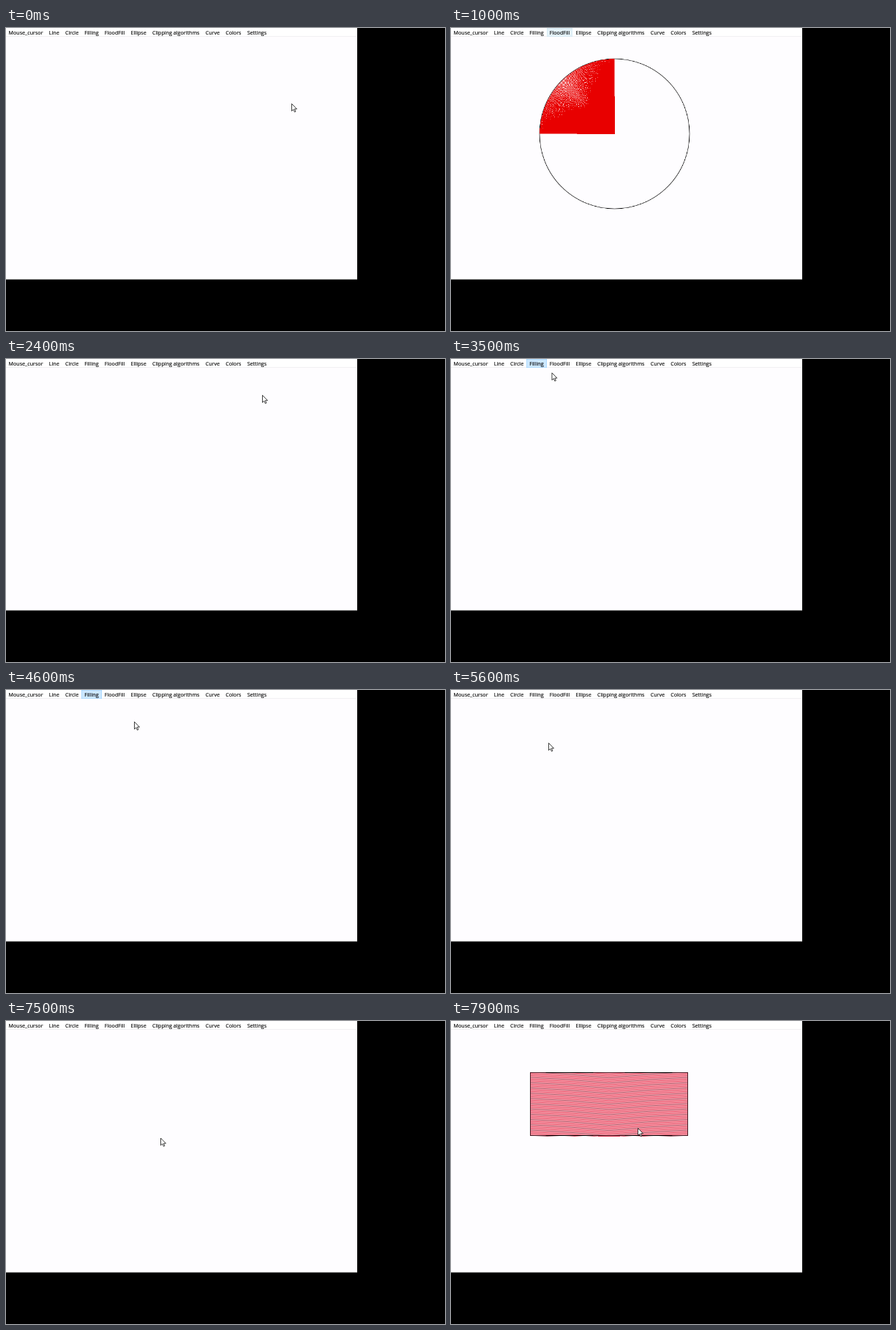
An HTML page with a canvas that plays this animation: 600 by 414 pixels, repeating every 8000 ms.

```html
<!DOCTYPE html>
<html lang="en">
<head>
<meta charset="utf-8">
<title>Drawing program</title>
<style>
  html, body { margin: 0; width: 100%; height: 100%; overflow: hidden; background: #000; }
  #window {
    position: absolute; left: 0; top: 0; width: 480px; height: 343px;
    background: #fefdff; border-bottom: 1px solid #888; overflow: hidden;
  }
  #menu {
    position: absolute; left: 0; top: 0; width: 480px; height: 11px; padding-left: 0;
    display: flex; background: #fff; border-bottom: 1px solid #f1f1f3;
  }
  #menu span {
    flex: none; height: 12px; padding: 0 4.1px; position: relative; left: -.6px;
    font: 7.15px/12px "Open Sans", "Noto Sans", sans-serif; color: #000;
    -webkit-text-stroke: .12px #000; white-space: pre;
  }
  #menu .hover { background: #e4f2f9; box-shadow: inset 0 0 0 .6px #d2e8f3; }
  #menu .open { background: #cce8ff; box-shadow: inset 0 0 0 .6px #99d1ff; }
  canvas, #cursor { position: absolute; }
  #cursor { left: 0; top: 0; width: 12px; height: 16px; overflow: visible; }
</style>
</head>
<body>
<div id="window">
  <div id="menu"></div>
  <svg id="cursor" viewBox="0 0 12 16">
    <path d="M.5 .5V10.4L2.8 8.3L4.4 11.8L5.9 11.1L4.4 7.7H7.5Z" fill="#fff" stroke="#111" stroke-width=".8"/>
  </svg>
</div>
<script>
const LOOP = 8000, STEP = 100;
const win = document.getElementById('window');
const menu = document.getElementById('menu');
const cursor = document.getElementById('cursor');

const items = {};
for (const label of ['Mouse_cursor', 'Line', 'Circle', 'Filling', 'FloodFill', 'Ellipse',
                     'Clipping algorithms', 'Curve', 'Colors', 'Settings']) {
  const span = document.createElement('span');
  span.textContent = label;
  menu.append(span);
  items[label] = span;
}

function layer(x, y, w, h, scale = 1) {
  const c = document.createElement('canvas');
  c.width = w;
  c.height = h;
  c.style.cssText = `left:${x}px;top:${y}px;width:${w * scale}px;height:${h * scale}px`;
  win.insertBefore(c, cursor);
  return [c, c.getContext('2d')];
}

function ddaLine(g, x0, y0, x1, y1) {
  const n = Math.max(Math.abs(x1 - x0), Math.abs(y1 - y0));
  for (let i = 0; i <= n; i++) {
    g.fillRect(Math.round(x0 + (x1 - x0) * i / n), Math.round(y0 + (y1 - y0) * i / n), 1, 1);
  }
}

// A quarter filled by spokes to each pixel of the circle, leaving gaps near 45 degrees
const R = 170, MID = 172, SCALE = 0.6;
const disc = [223.4 - MID * SCALE, 144.6 - MID * SCALE, 2 * MID, 2 * MID, SCALE];
const [circle, cg] = layer(...disc);
cg.lineWidth = 1.1;
cg.arc(MID, MID, R + .3, 0, 2 * Math.PI);
cg.stroke();
const [quarter, qg] = layer(...disc);
qg.fillStyle = '#e80000';
for (let x = 1, y = R, d = 4 - R; x <= y; x++) {
  ddaLine(qg, MID, MID, MID - x, MID - y);
  ddaLine(qg, MID, MID, MID - y, MID - x);
  if (d < 0) d += 2 * x + 3;
  else { d += 2 * (x - y) + 5; y--; }
}

// A rectangle filled by fine curves that sag toward the middle
const W = 216, H = 87, SAG = 8;
const [rect, rg] = layer(108, 70, W, H + 1);
rg.fillStyle = '#f7a0ad';
rg.fillRect(0, 0, W, H);
for (let y = 0.5 - SAG, row = 0; y < H; y += 2.4, row++) {
  rg.strokeStyle = row % 3 ? '#e2405a' : '#a04a5a';
  rg.lineWidth = .8;
  rg.beginPath();
  rg.moveTo(0, y);
  rg.quadraticCurveTo(W / 4, y + SAG * .3, W / 2, y + SAG);
  rg.quadraticCurveTo(W * 3 / 4, y + SAG * .3, W, y);
  rg.stroke();
}
rg.fillStyle = '#e2405a';
rg.fillRect(W / 2 - 15, H, 30, 1);
rg.strokeStyle = '#4a1a24';
rg.lineWidth = 1;
rg.strokeRect(.5, .5, W - 1, H - 1);
rg.fillStyle = '#000';
for (const x of [.1, .6]) {
  for (const y of [0, H - 1]) rg.fillRect(x * W, y, .3 * W, 1);
}

// Pointer keys: time, x, y
const path = [
  [0, 390, 103], [400, 224, 145], [1000, 148, 6], [1800, 426, 22],
  [2400, 350, 49], [2900, 117, 5], [4600, 175, 43], [5600, 133, 72],
  [6600, 401, 120], [7100, 167, 173], [7900, 255, 146], [LOOP, 266, 143]
];

function pointerAt(t) {
  const i = path.findIndex(k => k[0] > t);
  const [t0, x0, y0] = path[i - 1], [t1, x1, y1] = path[i];
  const p = (t - t0) / (t1 - t0);
  return [x0 + (x1 - x0) * p, y0 + (y1 - y0) * p];
}

const show = (el, on) => { el.style.visibility = on ? 'visible' : 'hidden'; };
const start = performance.now();

function draw(now) {
  const elapsed = Math.max(0, now - start) % LOOP;
  const t = Math.floor(elapsed / STEP) * STEP;
  const within = (a, b) => t >= a && t < b;
  const [x, y] = pointerAt(t);
  cursor.style.transform = `translate(${x}px,${y}px)`;
  show(cursor, !within(1000, 1100));
  show(circle, within(600, 1900));
  show(quarter, within(800, 1900));
  show(rect, t >= 7600);
  items.FloodFill.className = within(900, 1100) ? 'hover' : '';
  items.Filling.className = within(2800, 5500) ? 'open' : '';
  requestAnimationFrame(draw);
}
draw(start);
</script>
</body>
</html>
```
